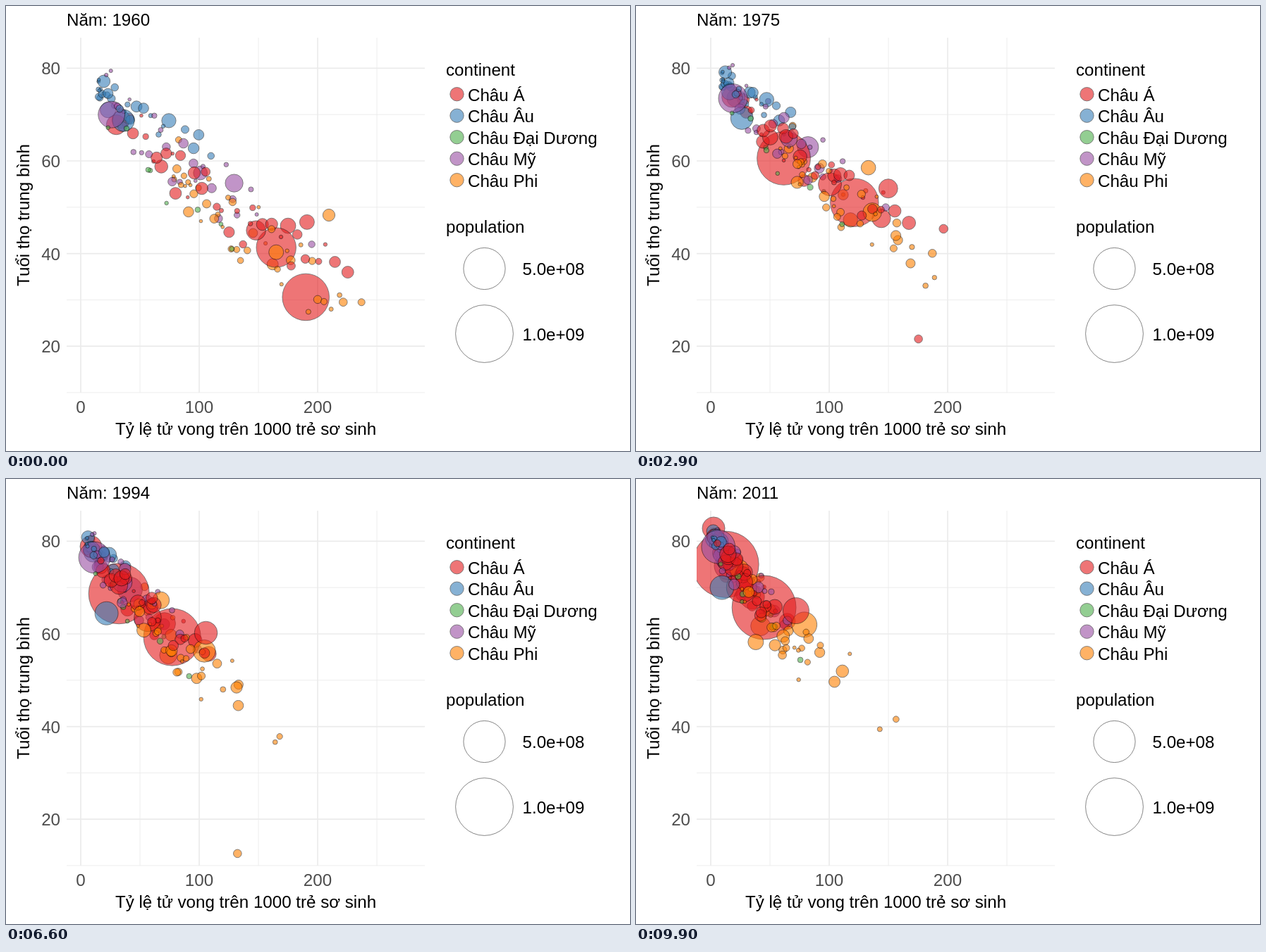
Animation of 885 by 632 pixels, one loop 10 s. Source, as an HTML page:

```html
<!DOCTYPE html>
<html lang="vi">
<head>
<meta charset="utf-8">
<title>Tuổi thọ và tử vong trẻ sơ sinh</title>
<style>
html, body { margin: 0; width: 100%; height: 100%; overflow: hidden; background: #fff; }
svg { display: block; width: 885px; height: 632px; font: 24.15px "Liberation Sans", Arial, sans-serif; }
.tick { fill: #4d4d4d; }
.major { stroke: #ebebeb; stroke-width: 1.7; }
.minor { stroke: #ebebeb; stroke-width: .9; }
.dot { stroke: #000; stroke-width: .8; opacity: .6; }
.mid { text-anchor: middle; }
.end { text-anchor: end; }
</style>
</head>
<body>
<svg viewBox="0 0 885 632">
  <clipPath id="panel"><rect x="86" y="45" width="508" height="504.5"/></clipPath>
  <g id="grid"></g>
  <g id="dots" clip-path="url(#panel)"></g>
  <g id="labels"></g>
</svg>
<script>
const RED = '#e41a1c', BLUE = '#377eb8', GREEN = '#4daf4a', PURPLE = '#984ea3', ORANGE = '#ff7f00';
const START = 1960, SPAN = 51, FRAMES = 100, STEP = 100;

// Scales: infant mortality, life expectancy, population in millions
const toX = imr => 106 + 1.68 * imr;
const toY = life => 88.4 + 6.58 * (80 - life);
const toR = pop => 2.3 + 1.22 * Math.sqrt(pop);

function add(parent, tag, attrs, text) {
  const el = document.createElementNS('http://www.w3.org/2000/svg', tag);
  for (const key in attrs) el.setAttribute(key, attrs[key]);
  if (text) el.textContent = text;
  document.getElementById(parent).append(el);
  return el;
}
const label = (x, y, text, attrs) => add('labels', 'text', { x, y, ...attrs }, text);
const column = (x, cls) => add('grid', 'line', { x1: x, y1: 45, x2: x, y2: 549, class: cls });
const row = (y, cls) => add('grid', 'line', { x1: 86, y1: y, x2: 594, y2: y, class: cls });

// Axes and grid
for (let imr = 50; imr < 300; imr += 100) column(toX(imr), 'minor');
for (let life = 10; life < 80; life += 20) row(toY(life), 'minor');
for (let imr = 0; imr < 300; imr += 100) {
  column(toX(imr), 'major');
  label(toX(imr), 578, String(imr), { class: 'tick mid' });
}
for (let life = 20; life <= 80; life += 20) {
  row(toY(life), 'major');
  label(77, toY(life) + 9, String(life), { class: 'tick end' });
}
label(340, 609, 'Tỷ lệ tử vong trên 1000 trẻ sơ sinh', { class: 'mid' });
label(0, 0, 'Tuổi thọ trung bình', { class: 'mid', transform: 'translate(33 297) rotate(-90)' });
const title = label(86, 28, 'Năm: 1960');

// Legends
label(624, 99, 'continent');
[['Châu Á', RED], ['Châu Âu', BLUE], ['Châu Đại Dương', GREEN], ['Châu Mỹ', PURPLE], ['Châu Phi', ORANGE]]
  .forEach(([name, fill], i) => {
    const cy = 125.2 + 30.5 * i;
    add('labels', 'circle', { cx: 639.5, cy, r: 9.7, fill, class: 'dot' });
    label(655, cy + 9.5, name);
  });
label(624, 322, 'population');
for (const [cy, pop, name] of [[373, 500, '5.0e+08'], [465.5, 1000, '1.0e+09']]) {
  add('labels', 'circle', { cx: 678.5, cy, r: toR(pop), fill: 'none', class: 'dot' });
  label(732.5, cy + 9, name);
}

const mix = (a, b, t) => a + (b - a) * t;
let seed = 7;
function rnd() {
  seed = seed + 0x6d2b79f5 | 0;
  let t = Math.imul(seed ^ seed >>> 15, 1 | seed);
  t = t + Math.imul(t ^ t >>> 7, 61 | t) ^ t;
  return ((t ^ t >>> 14) >>> 0) / 4294967296;
}
const noise = () => rnd() + rnd() - 1;

// Mortality falls half linearly, half geometrically; life expectancy eases out.
// A shock is a passing setback around its peak year.
const bubbles = [];
function bubble(z, fill, [pop0, pop1], [imr0, life0], [imr1, life1], { shock, from = START } = {}) {
  bubbles.push({
    z, fill,
    at(year) {
      const t = (year - START) / SPAN;
      const hit = shock ? Math.max(0, 1 - ((year - shock.peak) / shock.width) ** 2) : 0;
      const imr = (mix(imr0, imr1, t) + imr0 * (imr1 / imr0) ** t) / 2;
      const life = mix(life0, life1, t ** .75);
      return {
        cx: toX(imr + (hit && hit * shock.imr)),
        cy: toY(life - (hit && hit * shock.life)),
        r: year < from ? 0 : toR(mix(pop0, pop1, t))
      };
    }
  });
}

// Large or unusual countries, drawn in alphabetical order
function country(name, ...rest) {
  bubble((name.charCodeAt(0) - 65) / 26 + (name.charCodeAt(1) - 97) / 676, ...rest);
}
country('Bangladesh', RED, [50, 153], [175, 46], [35, 68], { shock: { peak: 1973, width: 6, life: 8, imr: 25 } });
country('Cambodia', RED, [6, 14], [137, 42], [35, 66], { shock: { peak: 1977, width: 6, life: 34, imr: 86 } });
country('China', RED, [645, 1350], [95, 51], [12.5, 75], { shock: { peak: 1960, width: 5, life: 20.4, imr: 95 } });
country('India', RED, [450, 1250], [165, 41.3], [45, 65.7]);
country('Indonesia', RED, [89, 245], [148, 45], [26, 70], { shock: { peak: 1965.5, width: 4, life: 6, imr: 0 } });
country('Japan', RED, [93, 127], [30, 67.8], [2.4, 82.8]);
country('Pakistan', RED, [45, 176], [191, 46.8], [72, 65]);
country('South Korea', RED, [25, 50], [80, 53], [3, 81]);
country('Vietnam', RED, [33, 90], [68, 58.8], [19, 74.6]);
country('Yemen', RED, [5, 24], [300, 33], [42, 64], { from: 1963 });
country('Germany', BLUE, [73, 82], [34, 69], [3.5, 80.5]);
country('Russia', BLUE, [120, 143], [36, 68.7], [9.5, 70], { shock: { peak: 1998, width: 11, life: 6, imr: 6 } });
country('United Kingdom', BLUE, [52, 63], [23, 71], [4.3, 80.8]);
country('Brazil', PURPLE, [72, 198], [129.5, 55.2], [14.6, 74.7]);
country('Haiti', PURPLE, [4, 10], [195, 42], [62, 62], { shock: { peak: 2010, width: 1, life: 30, imr: 22 } });
country('Mexico', PURPLE, [38, 120], [101, 57.4], [14, 76]);
country('United States', PURPLE, [186, 312], [26, 70], [6.4, 78.8]);
country('Egypt', ORANGE, [27, 83], [209.5, 48.3], [24, 74]);
country('Ethiopia', ORANGE, [22, 90], [162, 37.7], [42, 61.7], { shock: { peak: 1983.5, width: 3, life: 17, imr: 12 } });
country('Mali', ORANGE, [5, 16], [237, 29.5], [92, 56]);
country('Nigeria', ORANGE, [45, 164], [165, 40.3], [79, 62]);
country('Rwanda', ORANGE, [3, 11], [127, 41], [43, 63.5], { shock: { peak: 1994, width: 2, life: 45, imr: 66 } });
country('South Africa', ORANGE, [17, 51], [91, 49], [38, 65], { shock: { peak: 2006, width: 10, life: 9, imr: 0 } });

// Typical life expectancy at a given mortality, first and last year
const firstTrend = imr => 78 - .265 * imr + .00032 * imr * imr;
const lastTrend = imr => 81 - .37 * imr + .0011 * imr * imr;

// Smaller countries of one continent, spread along the trend
function crowd(fill, n, { low, high, skew, left, lift, scatter, size, growth, epidemic = 0 }) {
  for (let i = 0; i < n; i++) {
    const imr0 = mix(low, high, ((i + rnd()) / n) ** skew);
    const imr1 = left * imr0 * 2 ** (1.1 * noise());
    const off = scatter * noise();
    const pop = size * rnd() ** 3;
    const shock = rnd() < epidemic && { peak: 2003, width: 11, life: 4 + 9 * rnd(), imr: 6 };
    bubble(rnd(), fill, [pop, pop * growth],
      [imr0, firstTrend(imr0) + lift * imr0 + off],
      [imr1, Math.min(82.5, lastTrend(imr1) + lift * imr1 + off * .7)], { shock });
  }
}
crowd(RED, 31, { low: 33, high: 226, skew: 1.25, left: .2, lift: 0, scatter: 6, size: 28, growth: 2.2 });
crowd(BLUE, 28, { low: 15, high: 118, skew: 2.8, left: .14, lift: .09, scatter: 4, size: 45, growth: 1.15 });
crowd(GREEN, 8, { low: 23, high: 136, skew: 1.2, left: .35, lift: -.07, scatter: 5, size: 2, growth: 2 });
crowd(PURPLE, 25, { low: 20, high: 150, skew: 1.2, left: .27, lift: .02, scatter: 8, size: 14, growth: 2 });
crowd(ORANGE, 38, { low: 78, high: 226, skew: 1.5, left: .42, lift: -.02, scatter: 10, size: 13, growth: 2.7, epidemic: .35 });

bubbles.sort((a, b) => a.z - b.z);
for (const b of bubbles) b.el = add('dots', 'circle', { fill: b.fill, class: 'dot' });

let shown = -1;
function draw() {
  const frame = Math.floor(performance.now() / STEP) % FRAMES;
  if (frame !== shown) {
    shown = frame;
    const year = START + SPAN * frame / (FRAMES - 1);
    title.textContent = 'Năm: ' + Math.round(year);
    for (const { el, at } of bubbles) {
      const place = at(year);
      for (const key in place) el.setAttribute(key, place[key].toFixed(2));
    }
  }
  requestAnimationFrame(draw);
}
draw();
</script>
</body>
</html>
```
